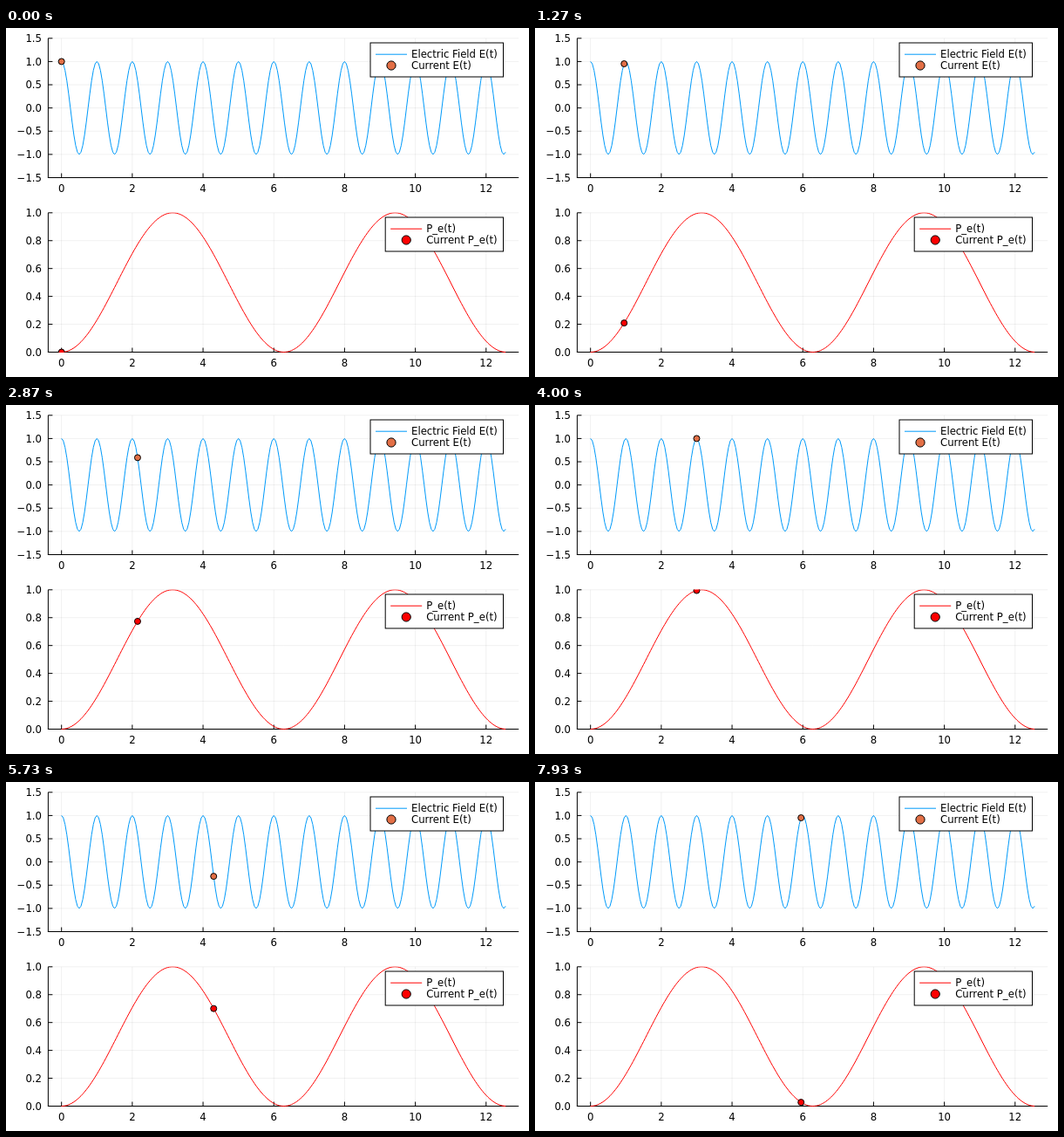
An HTML page with a canvas that plays this animation: 600 by 400 pixels, repeating every 8000 ms.

```html
<!DOCTYPE html>
<html lang="en">
<head>
<meta charset="utf-8">
<style>
html, body { margin: 0; width: 100%; height: 100%; overflow: hidden; background: #fff; }
canvas { display: block; }
</style>
</head>
<body>
<canvas id="stage" width="600" height="400"></canvas>
<script>
const ctx = document.getElementById('stage').getContext('2d');
const LOOP = 8000, STEP = 0.05, SAMPLES = 251;
const LEFT = 48.4, RIGHT = 588.2, X0 = 63.7, X_SCALE = 40.59;
const FONT = '11.7px "DejaVu Sans", sans-serif';

const plots = [
  {
    top: 11.8, bottom: 171.5, min: -1.5, max: 1.5, tick: 0.5,
    value: t => Math.cos(2 * Math.PI * t),
    line: '#009afa', dot: '#e26f46',
    legend: { x: 418, y: 17, w: 152.5, labels: ['Electric Field E(t)', 'Current E(t)'] }
  },
  {
    top: 211.8, bottom: 371.5, min: 0, max: 1, tick: 0.2,
    value: t => (1 - Math.cos(t)) / 2,
    line: '#ff0000', dot: '#ff0000',
    legend: { x: 435.2, y: 217, w: 135.3, labels: ['P_e(t)', 'Current P_e(t)'] }
  }
];

const px = t => X0 + t * X_SCALE;
const py = (p, v) => p.bottom - (v - p.min) / (p.max - p.min) * (p.bottom - p.top);

function segment(x1, y1, x2, y2, color, width = 1) {
  ctx.strokeStyle = color;
  ctx.lineWidth = width;
  ctx.beginPath();
  ctx.moveTo(x1, y1);
  ctx.lineTo(x2, y2);
  ctx.stroke();
}

function disc(x, y, r, color) {
  ctx.beginPath();
  ctx.arc(x, y, r, 0, 2 * Math.PI);
  ctx.fillStyle = color;
  ctx.fill();
  ctx.strokeStyle = '#000';
  ctx.lineWidth = 1;
  ctx.stroke();
}

function label(text, x, y, align) {
  ctx.font = FONT;
  ctx.textAlign = align;
  ctx.fillStyle = '#000';
  ctx.fillText(text, x, y);
}

function drawAxes(p) {
  const grid = 'rgba(0,0,0,0.1)';
  const count = Math.round((p.max - p.min) / p.tick);
  for (let t = 0; t <= 12; t += 2) {
    const x = px(t);
    segment(x, p.top, x, p.bottom, grid, 0.6);
    segment(x, p.bottom, x, p.bottom - 5, '#000');
    label(String(t), x, p.bottom + 16, 'center');
  }
  for (let i = 0; i <= count; i++) {
    const v = p.min + i * p.tick, y = py(p, v);
    segment(LEFT, y, RIGHT, y, grid, 0.6);
    segment(LEFT, y, LEFT + 5, y, '#000');
    label(v.toFixed(1).replace('-', '\u2212'), 41, y + 4.2, 'right');
  }
  segment(LEFT, p.top, LEFT, p.bottom, '#000');
  segment(LEFT - 0.5, p.bottom, RIGHT, p.bottom, '#000');
}

function drawCurve(p) {
  ctx.strokeStyle = p.line;
  ctx.lineWidth = 1;
  ctx.lineJoin = 'round';
  ctx.beginPath();
  for (let i = 0; i <= SAMPLES; i++) {
    ctx.lineTo(px(i * STEP), py(p, p.value(i * STEP)));
  }
  ctx.stroke();
}

function drawLegend(p) {
  const { x, y, w, labels } = p.legend;
  ctx.fillStyle = '#fff';
  ctx.fillRect(x, y, w, 39);
  ctx.strokeStyle = '#000';
  ctx.lineWidth = 1;
  ctx.strokeRect(x, y, w, 39);
  segment(x + 6, y + 13.2, x + 42, y + 13.2, p.line);
  disc(x + 24, y + 26, 5.1, p.dot);
  labels.forEach((text, i) => label(text, x + 47, y + 17.4 + i * 13, 'left'));
}

// 15 steps a second, with delays of 70, 60 and 70 ms
function stepAt(ms) {
  const rest = ms % 200;
  return 3 * Math.floor(ms / 200) + (rest >= 130 ? 2 : rest >= 70 ? 1 : 0);
}

function draw(ms) {
  const t = stepAt(ms) * STEP;
  ctx.fillStyle = '#fff';
  ctx.fillRect(0, 0, 600, 400);
  for (const p of plots) {
    drawAxes(p);
    ctx.save();
    ctx.beginPath();
    ctx.rect(LEFT, p.top - 0.4, RIGHT - LEFT, p.bottom - p.top + 0.9);
    ctx.clip();
    drawCurve(p);
    disc(px(t), py(p, p.value(t)), 3.5, p.dot);
    ctx.restore();
    drawLegend(p);
  }
}

const start = performance.now();
function frame() {
  draw((performance.now() - start) % LOOP);
  requestAnimationFrame(frame);
}
frame();
</script>
</body>
</html>
```
